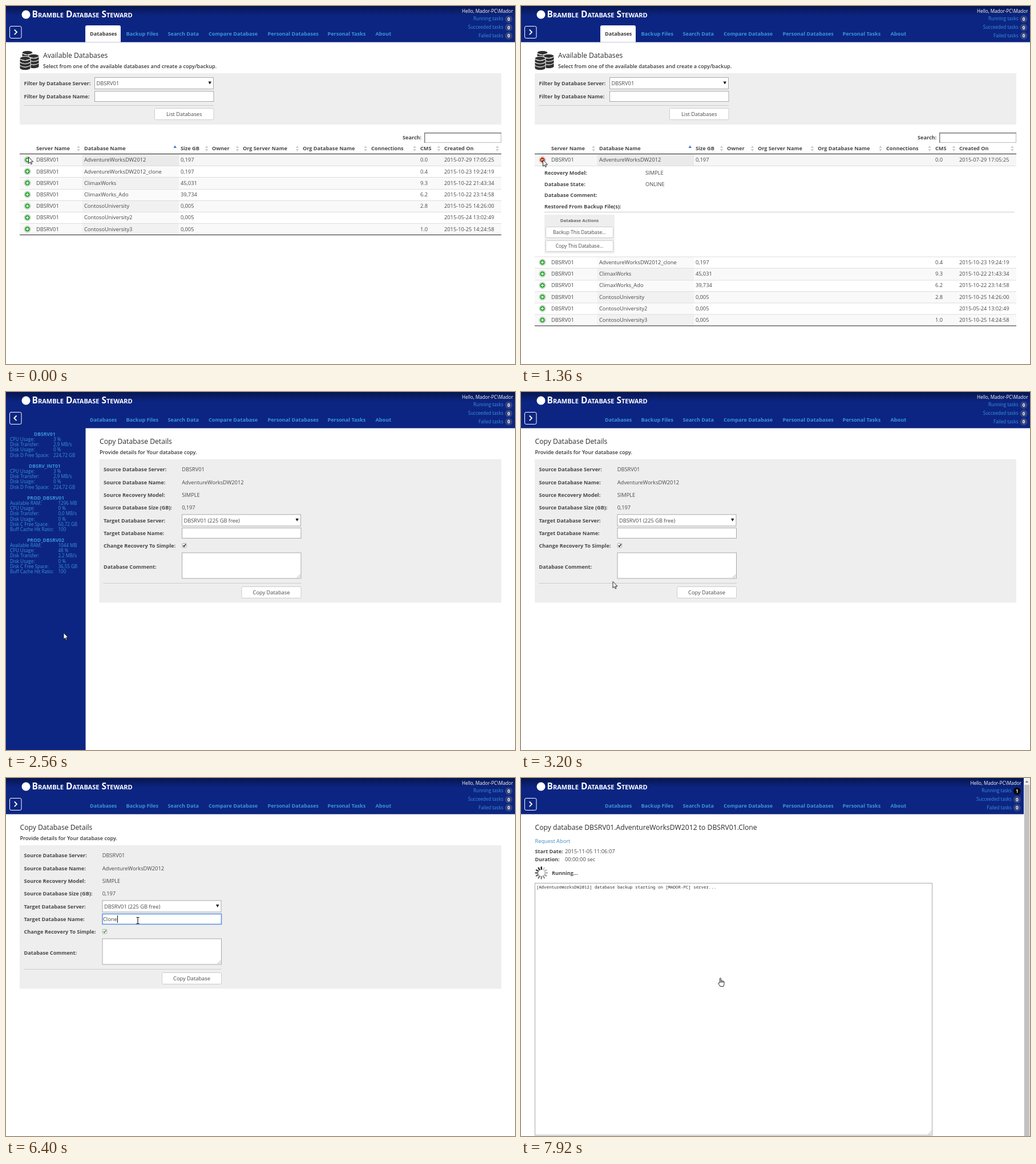
An HTML page that plays this animation: 892 by 628 pixels, repeating every 8000 ms.

```html
<!DOCTYPE html>
<html lang="en">
<head>
<meta charset="utf-8">
<title>Database copy demo</title>
<style>
html, body { margin: 0; width: 100%; height: 100%; overflow: hidden; background: #fff; }
svg { display: block; }
text { font: 9.28px "Open Sans", "Noto Sans", sans-serif; fill: #484848; white-space: pre; }
.b { font-size: 9.13px; font-weight: 700; }
.sub { font-size: 9.15px; font-weight: 600; fill: #383838; }
.h { font-size: 12.17px; fill: #2c2c2c; }
.nav { font-size: 9.1px; font-weight: 700; fill: #3b93dc; }
.on { fill: #3c3c3c; }
.s { font-size: 8.05px; fill: #3b93dc; }
.sb { font-size: 8.5px; font-weight: 700; fill: #3b93dc; }
.w { font-size: 8.14px; fill: #fff; }
.n { font-size: 8px; font-weight: 700; fill: #fff; }
.brand { font-size: 15.5px; font-weight: 700; font-variant: small-caps; fill: #fff; }
.act { font-size: 7.75px; font-weight: 700; fill: #6a6a6a; }
.sm { font-size: 8.42px; }
.link { fill: #3d8cc9; }
.m { font: 7.42px "Noto Sans Mono", "DejaVu Sans Mono", monospace; fill: #333; }
.mid { text-anchor: middle; }
.end { text-anchor: end; }
</style>
</head>
<body>
<script>
const BLUE = '#0c2582', LOOP = 8000, STEP = 80;

// Markup helpers
const text = (x, y, s, cls = '') => `<text x="${x}" y="${y}" class="${cls}">${s}</text>`;
const rect = (x, y, w, h, fill, more = '') =>
  `<rect x="${x}" y="${y}" width="${w}" height="${h}" fill="${fill}" ${more}/>`;
const box = (x, y, w, h, id = '', rx = 0, line = '#a9a9a9') =>
  rect(x + .5, y + .5, w - 1, h - 1, '#fff', `stroke="${line}" rx="${rx}" ${id && `id="${id}"`}`);
const path = (d, fill, more = '') => `<path d="${d}" fill="${fill}" ${more}/>`;
const line = (x1, x2, y, color = '#ccc') => rect(x1, y, x2 - x1, 1, color);
const group = (id, body, more = '') => `<g id="${id}" ${more}>${body}</g>`;
const button = (x, y, w, h, label, id = '', cls = '') =>
  box(x, y, w, h, id, 2, '#ccc') + text(x + w / 2, y + h / 2 + 3.4, label, 'mid ' + cls);
const select = (x, y, label) => box(x, y, 209, 21) + text(x + 3.5, y + 14, label) +
  path(`M${x + 199.5} ${y + 7.5}h5.4l-2.7 5z`, '#111');
const grip = (x, y) => path(`M${x - 6} ${y}l6-6M${x - 3} ${y}l3-3`, 'none', 'stroke="#999" stroke-width=".8"');

function header() {
  const tabs = [['Databases', 147], ['Backup Files', 210.5], ['Search Data', 283.5], ['Compare Database', 355],
    ['Personal Databases', 458.5], ['Personal Tasks', 563.5], ['About', 647.5]];
  const tasks = ['Running', 'Succeeded', 'Failed'].map((name, i) => {
    const y = 22.5 + i * 14.6;
    return text(871.5, y + 2.8, name + ' tasks', 's end') +
      `<circle cx="881" cy="${y + .5}" r="6.4" fill="#35457f" ${i ? '' : 'id="badge"'}/>` +
      `<text x="881" y="${y + 3.5}" class="n mid" ${i ? '' : 'id="count"'}>0</text>`;
  }).join('');
  return rect(0, 0, 892, 63.5, 'url(#sky)') +
    '<circle cx="35" cy="15" r="7.5" fill="#fff"/>' + text(45.5, 20, 'Bramble Database Steward', 'brand') +
    rect(6.5, 35.5, 20.5, 21, 'none', 'stroke="#fff" rx="2.5"') +
    '<path id="chev" fill="none" stroke="#fff" stroke-width="1.8"/>' +
    path('M139 63.5V37q0-3 3-3h56q3 0 3 3v26.5z', '#fff', 'id="tab"') +
    tabs.map(([s, x], i) => `<g ${i ? '' : 'id="first"'}>${text(x, 52.3, s, 'nav')}</g>`).join('') +
    group('tasks', text(888.5, 12, 'Hello, Mador-PC\\Mador', 'w end') + tasks);
}

function cylinder(x, y, h) {
  const band = k => path(`M${x} ${y + k}q9.5 6 19 0`, 'none', 'stroke="#fff" stroke-width="1.1"');
  return path(`M${x} ${y + 3.5}a9.5 3.7 0 0 1 19 0v${h - 7}a9.5 3.7 0 0 1-19 0z`, '#303030', 'stroke="#fff" stroke-width="1"') +
    band(4.2) + band(10) + band(15.6);
}

const rows = [
  ['AdventureWorksDW2012', '0,197', '0.0', '2015-07-29 17:05:25'],
  ['AdventureWorksDW2012_clone', '0,197', '0.4', '2015-10-23 19:24:19'],
  ['ClimaxWorks', '45,031', '9.3', '2015-10-22 21:43:34'],
  ['ClimaxWorks_Ado', '39,734', '6.2', '2015-10-22 23:14:58'],
  ['ContosoUniversity', '0,005', '2.8', '2015-10-25 14:26:00'],
  ['ContosoUniversity2', '0,005', '', '2015-05-24 13:02:49'],
  ['ContosoUniversity3', '0,005', '1.0', '2015-10-25 14:24:58']
];

function row([name, size, cms, date], i) {
  const y = 260 + i * 20.23, odd = i % 2 === 0, b = y + 13.3;
  return rect(24, y, 844, 20.3, odd ? '#f9f9f9' : '#fff', i ? '' : 'id="hover"') +
    rect(133.5, y, 169.5, 20.3, odd ? '#f1f1f1' : '#fafafa', i ? '' : 'id="sorted"') +
    (i ? line(24, 868, Math.round(y), '#ddd') : '') +
    `<circle cx="37.5" cy="${y + 10}" r="5.6" fill="#fff" stroke="#aaa" stroke-width=".8"/>` +
    `<circle cx="37.5" cy="${y + 10}" r="4.4" fill="#2eac33" ${i ? '' : 'id="dot"'}/>` +
    rect(35.2, y + 9.3, 4.6, 1.4, '#fff') + rect(36.8, y + 7.7, 1.4, 4.6, '#fff', i ? '' : 'id="plus"') +
    text(53, b, 'DBSRV01') + text(137, b, name) + text(306, b, size) + text(726, b, cms) + text(768, b, date);
}

function listPage() {
  const cols = [['Server Name', 53, 127], ['Database Name', 137, 0], ['Size GB', 306, 351.5], ['Owner', 361, 405.5],
    ['Org Server Name', 415, 510.5], ['Org Database Name', 520, 630], ['Connections', 640, 716],
    ['CMS', 726, 758.5], ['Created On', 768, 861]];
  const sort = x => path(`M${x - 2.7} 249h5.4l-2.7-4zM${x - 2.7} 251h5.4l-2.7 4z`, '#ccc');
  const facts = [['Recovery Model:', 'SIMPLE'], ['Database State:', 'ONLINE'], ['Database Comment:', ''],
    ['Restored From Backup File(s):', '']];
  const details = rect(24, 280, 844, 160, '#fff') + line(24, 868, 280, '#ddd') +
    facts.map(([k, v], i) => text(41, 296.3 + i * 19.5, k, 'b') + text(218, 296.3 + i * 19.5, v)).join('') +
    line(41, 865, 361) + rect(41, 366, 123, 68, '#eee') +
    text(102.5, 378.6, 'Database Actions', 'act mid') +
    button(43, 387, 119, 20, 'Backup This Database...', '', 'sm') +
    button(43, 411, 119, 20, 'Copy This Database...', 'copy', 'sm');
  return cylinder(28, 78.5, 23) + cylinder(39, 84.5, 25) + cylinder(24, 88.5, 24) +
    text(65, 91.3, 'Available Databases', 'h') +
    text(65, 109.3, 'Select from one of the available databases and create a copy/backup.', 'sub') +
    rect(24, 118, 844, 90, '#eee') +
    text(31.5, 139.4, 'Filter by Database Server:', 'b') + select(155, 125, 'DBSRV01') +
    text(31.5, 161.6, 'Filter by Database Name:', 'b') + box(155, 149, 209.5, 19) +
    line(31, 364, 174) + button(260, 179, 104.5, 21, 'List Databases') +
    text(695, 234, 'Search:', 'b') + box(733, 222, 135, 18, '', 0, '#bbb') +
    path('M733.7 240v-17.3H868', 'none', 'stroke="#777" stroke-width="1.4"') +
    cols.map(([s, x, k]) => text(x, 253.2, s, 'b') + (k ? sort(k) : path('M293.4 249h5.6l-2.8-4.4z', '#3f7fd6'))).join('') +
    line(24, 868, 259, '#222') + row(rows[0], 0) +
    `<svg id="slide" x="0" y="280" width="892" height="0"><g transform="translate(0 -280)">${details}</g></svg>` +
    group('below', rows.slice(1).map((r, i) => row(r, i + 1)).join('') + line(24, 868, 401, '#222'));
}

function formPage() {
  const labels = [['Source Database Server:', 136, 'DBSRV01'], ['Source Database Name:', 158.3, 'AdventureWorksDW2012'],
    ['Source Recovery Model:', 180.7, 'SIMPLE'], ['Source Database Size (GB):', 203, '0,197'],
    ['Target Database Server:', 225.3, ''], ['Target Database Name:', 247.6, ''],
    ['Change Recovery To Simple:', 269.8, ''], ['Database Comment:', 306.3, '']];
  return text(24.5, 91.3, 'Copy Database Details', 'h') +
    text(24.5, 109.3, 'Provide details for Your database copy.', 'sub') +
    rect(24, 118, 844, 251.5, '#eee', 'id="panel"') +
    labels.map(([s, y, v]) => text(31.5, y + 3.4, s, 'b') + text(168.7, y + 3.4, v)).join('') +
    select(168.5, 214.5, 'DBSRV01 (225 GB free)') +
    box(168.5, 238, 209.5, 19, 'field') + '<text id="typed" x="170" y="251"></text>' +
    rect(170, 241, 1, 13, '#111', 'id="caret"') +
    rect(169.2, 265.5, 7.4, 7.4, '#fff', 'stroke="#aaa" rx="1"') +
    path('M170.7 269.2l1.8 2 3-4.4', 'none', 'id="check" stroke-width="1.6"') +
    box(168.5, 281.5, 209.5, 46) + grip(376.5, 326) +
    line(31, 378, 335) + button(273, 341, 105, 21, 'Copy Database', 'go');
}

function sidebar() {
  const idle = ['CPU Usage:|3 %', 'Disk Transfer:|2,9 MB/s', 'Disk Usage:|0 %', 'Disk D Free Space:|224,72 GB'];
  const prod = (ram, cpu, io, free) => ['Available RAM:|' + ram + ' MB', 'CPU Usage:|' + cpu + ' %',
    'Disk Transfer:|' + io + ' MB/s', 'Disk Usage:|0 %', 'Disk C Free Space:|' + free + ' GB', 'Buff Cache Hit Ratio:|100'];
  const servers = [['DBSRV01', 74, 83, idle], ['DBSRV_INT01', 130, 83, idle],
    ['PROD_DBSRV01', 186, 91.5, prod(1296, 0, '0,0', '60,72')], ['PROD_DBSRV02', 260, 91.5, prod(1044, 48, '2,2', '36,55')]];
  return rect(0, 63, 139.5, 565, BLUE) + servers.map(([name, y, x, items]) =>
    text(x > 90 ? 69.5 : 67.8, y + 3.1, name, 'sb mid') + items.map((s, i) => {
      const [k, v] = s.split('|'), b = y + 12.2 + i * 9.1;
      return text(7, b, k, 's') + text(x, b, v, 's');
    }).join('')).join('');
}

function runPage() {
  let spokes = '';
  for (let i = 0; i < 12; i++) {
    const shade = 25 + Math.round(((11 - i) / 11) ** .8 * 175);
    spokes += rect(-1.2, -11.3, 2.4, 6, `rgb(${shade},${shade},${shade})`, `rx="1" transform="rotate(${i * 30 + 30})"`);
  }
  return text(24.5, 91.3, 'Copy database DBSRV01.AdventureWorksDW2012 to DBSRV01.Clone', 'h') +
    text(24.5, 114.3, 'Request Abort', 'link') +
    text(24.5, 131.6, 'Start Date:', 'b') + text(77, 131.6, '2015-11-05 11:06:07') +
    text(24.5, 145.6, 'Duration:', 'b') + text(77, 145.6, '00:00:00 sec') +
    `<g transform="translate(35.7 166.5)">${spokes}</g>` + text(54, 170.2, 'Running...', 'b') +
    box(24, 184, 697, 443) + grip(719.5, 625.5) +
    text(26.7, 194.4, '[AdventureWorksDW2012] database backup starting on [MADOR-PC] server...', 'm') +
    rect(881, 0, 11, 628, '#f1f1f1') + rect(882, 12, 9, 616, '#c1c1c1') + path('M883.8 8h5.4l-2.7-3.4z', '#777');
}

const ink = 'stroke="#111" stroke-width=".9" stroke-linejoin="round"';
const pointers =
  group('arrow', path('M0 0V11.2L2.6 8.8 4.3 12.6 6 11.8 4.4 8.2H8z', '#fff', ink)) +
  group('beam', path('M-2.5-5.5H-.6L0-5 .6-5.5H2.5M0-5V5M-2.5 5.5H-.6L0 5 .6 5.5H2.5', 'none', 'stroke="#111" stroke-width="1.1"')) +
  group('hand', path('M-2.6 1.5V-6.6q1-1.6 2 0V-2.6Q.5-3.4 1.3-2.2 2.4-2.8 3.2-1.5 4.6-2 5-.5V3.5L3.8 7.5H-2L-5.2 2.4Q-5.2.4-2.6 1.5zM-.6-2.6V1M1.3-2.2V1M3.2-1.5V1', '#fff', ink));

document.body.innerHTML = `<svg width="892" height="628" viewBox="0 0 892 628">
  <defs><linearGradient id="sky" x1="0" y1="0" x2="0" y2="1">
    <stop offset="0" stop-color="#07164e"/><stop offset=".27" stop-color="${BLUE}"/></linearGradient></defs>
  ${header()}${group('list', listPage())}${group('form', formPage())}${group('side', sidebar())}
  ${group('run', runPage())}${group('mouse', pointers)}</svg>`;

const $ = id => document.getElementById(id);
const set = (id, attrs) => { for (const k in attrs) $(id).setAttribute(k, attrs[k]); };
const show = (id, on) => { $(id).style.display = on ? '' : 'none'; };

// Pointer path: time, x, y
const track = [[0, 39.5, 265], [240, 38.5, 270], [1680, 38.5, 270], [1840, 68, 350], [2000, 101, 422.5], [2720, 101, 422.5],
  [3040, 130, 375], [3360, 192, 290], [3600, 226, 252], [3680, 219, 240], [3840, 216, 247], [6320, 216, 247],
  [6400, 231, 250], [6640, 330, 302], [6880, 399, 360], [7040, 374, 358], [7200, 351, 352], [7280, 349, 351], [LOOP, 349, 351]];
const keys = [[4560, 'C'], [4640, 'Cl'], [4880, 'Clo'], [5040, 'Clon'], [5120, 'Clone']];

function mouseAt(t) {
  const i = track.findIndex(k => k[0] > t);
  const [t0, x0, y0] = track[i - 1], [t1, x1, y1] = track[i];
  const p = (t - t0) / (t1 - t0);
  return [x0 + (x1 - x0) * p, y0 + (y1 - y0) * p];
}

function draw(t) {
  const list = t < 2560, run = t >= 7840, form = !list && !run, open = form && t < 2640;
  const [x, y] = mouseAt(t);
  const over = (l, top, r, b) => x >= l && x < r && y >= top && y < b;

  show('list', list); show('form', form); show('run', run); show('side', open); show('tab', list);
  $('first').firstChild.classList.toggle('on', list);
  set('chev', { d: open ? 'M18.5 41.5l-4.2 4.3 4.2 4.3' : 'M14.8 41.5l4.2 4.3-4.2 4.3' });
  set('tasks', { transform: `translate(${run ? -11.7 : 0} 0)` });
  set('badge', { fill: run ? '#080808' : '#35457f' });
  $('count').textContent = run ? 1 : 0;

  // Row details slide
  const p = Math.min(1, Math.max(0, (t - 940) / 400));
  const drop = 159.5 * (.5 - Math.cos(p * Math.PI) / 2);
  const hot = over(24, 260, 868, 280);
  set('slide', { height: drop });
  set('below', { transform: `translate(0 ${drop})` });
  set('dot', { fill: t < 960 ? '#2eac33' : '#c03a1c' });
  show('plus', t < 960);
  set('hover', { fill: hot ? '#f6f6f6' : '#f9f9f9' });
  set('sorted', { fill: hot ? '#eaeaea' : '#f1f1f1' });
  set('copy', { fill: over(43, 411, 162, 431) ? (t >= 2320 && t < 2400 ? '#d8d8d8' : '#e8e8e8') : '#fff',
    stroke: t >= 2320 ? '#6c9fe2' : '#ccc' });

  // Form
  const shift = open ? 139.5 : 0, focus = t >= 3680 && t < 7440;
  const typed = keys.filter(k => k[0] <= t).pop();
  const last = t < 4560 ? 3680 : t < 5120 ? typed[0] : 5120;
  set('form', { transform: `translate(${shift} 0)` });
  set('panel', { width: 844 - shift });
  $('typed').textContent = typed ? typed[1] : '';
  set('field', { stroke: focus ? '#5f95e4' : '#a9a9a9', 'stroke-width': focus ? 1.6 : 1 });
  const width = typed ? $('typed').getComputedTextLength() : 0;
  set('caret', { x: 170 + Math.round(width) });
  show('caret', focus && Math.floor((t - last) / 480) % 2 === 0);
  set('check', { stroke: t < 5760 ? '#333' : '#43a047' });
  set('go', { fill: over(273, 341, 378, 362) ? (t >= 7440 && t < 7600 ? '#d8d8d8' : '#e6e6e6') : '#fff',
    stroke: t >= 7440 ? '#6c9fe2' : '#ccc', 'stroke-width': t >= 7440 ? 1.5 : 1 });

  // Pointer
  const beam = form && !open && (over(168, 238, 378, 257) || over(168, 282, 378, 328));
  show('beam', beam); show('hand', run); show('arrow', !beam && !run);
  set('mouse', { transform: run ? 'translate(351 358)' : `translate(${x} ${y})` });
}

const start = performance.now();
function tick() {
  const t = (performance.now() - start) % LOOP;
  draw(Math.floor(t / STEP) * STEP);
  requestAnimationFrame(tick);
}
draw(0);
requestAnimationFrame(tick);
</script>
</body>
</html>
```
